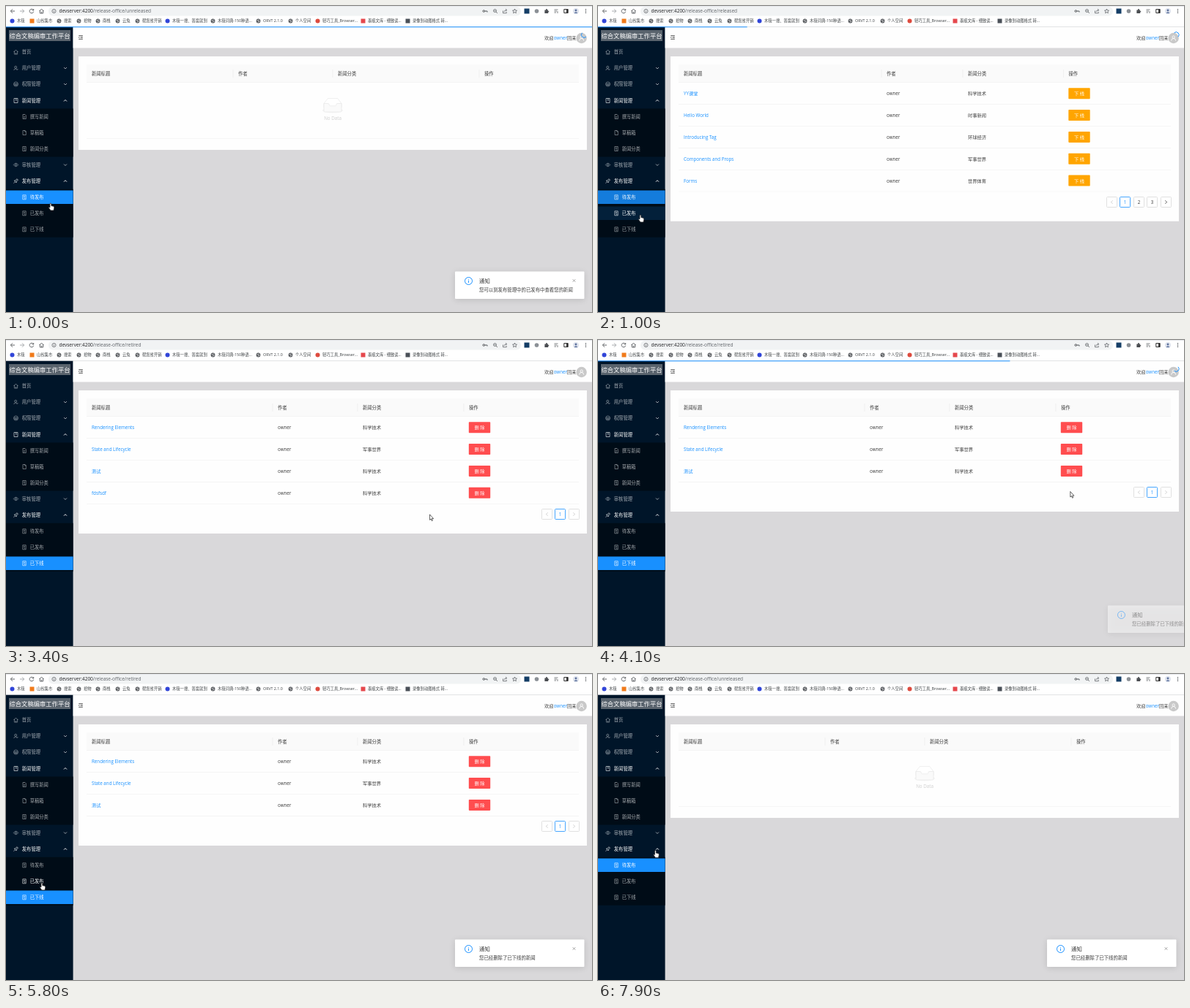
Write an HTML page with a canvas that moves like this. It is 800 px wide and 419 px high and loops after 8 s.

```html
<!DOCTYPE html>
<html lang="zh-CN">
<head>
<meta charset="utf-8">
<title>Publishing console</title>
<style>
html, body { margin: 0; width: 100%; height: 100%; overflow: hidden; background: #d9d8da; }
canvas { display: block; width: 800px; height: 419px; }
</style>
</head>
<body>
<canvas id="stage" width="800" height="419"></canvas>
<script>
const ctx = document.getElementById('stage').getContext('2d');
const LOOP = 8000, BLUE = '#1890ff', INK = '#3a3a3a', EDGE = '#f0f0f0', SIDE = 91.6;
const FONT = '"Open Sans", "Noto Sans CJK SC", "Noto Sans CJK", sans-serif';

// ---------- helpers ----------
const clamp = v => Math.max(0, Math.min(1, v));
const ease = v => (v = clamp(v)) < .5 ? 4 * v ** 3 : 1 - 4 * (1 - v) ** 3;

function track(keys, t) {
  let i = 1;
  while (i < keys.length - 1 && keys[i][0] < t) i++;
  const [a, b] = [keys[i - 1], keys[i]], p = clamp((t - a[0]) / (b[0] - a[0]));
  return a.slice(1).map((v, k) => v + (b[k + 1] - v) * p);
}

function rect(x, y, w, h, fill, stroke, r = 0) {
  ctx.beginPath();
  ctx.roundRect(x, y, w, h, r);
  if (fill) { ctx.fillStyle = fill; ctx.fill(); }
  if (stroke) { ctx.strokeStyle = stroke; ctx.lineWidth = .8; ctx.stroke(); }
}

function dot(x, y, r, fill) {
  ctx.beginPath();
  ctx.arc(x, y, r, 0, 7);
  ctx.fillStyle = fill;
  ctx.fill();
}

function text(str, x, y, size = 6.23, color = INK, weight = 400, align = 'left') {
  ctx.font = `${weight} ${size}px ${FONT}`;
  ctx.textAlign = align;
  ctx.fillStyle = color;
  ctx.fillText(str, x, y + size * .37);
}

function icon(d, x, y, stroke, fill, width = .75) {
  ctx.save();
  ctx.translate(x, y);
  const path = new Path2D(d);
  if (fill) { ctx.fillStyle = fill; ctx.fill(path); }
  if (stroke) { ctx.strokeStyle = stroke; ctx.lineWidth = width; ctx.stroke(path); }
  ctx.restore();
}

const ring = r => `M${-r} 0a${r} ${r} 0 1 0 ${2 * r} 0a${r} ${r} 0 1 0 ${-2 * r} 0`;
const ICONS = {
  home: 'M-3 0L0 -3L3 0M-2.1 -1V3H2.1V-1M0 3V1',
  user: 'M-2.8 3a2.6 2.6 0 0 1 4.6 -1M-1.8 -1.2a1.5 1.5 0 1 0 3 0a1.5 1.5 0 1 0 -3 0M1 3L3 1',
  crown: ring(3) + 'M-1.5 -1L0 0L1.5 -1V1.4H-1.5Z',
  book: 'M-2.5 -3H2.5V3H-2.5ZM.2 -3V0L1 -.6',
  write: 'M-2 -3H1L2.3 -1.7V3H-2ZM-1 .2H1.2M-1 1.6H.6',
  file: 'M-2 -3H1L2.3 -1.7V3H-2ZM.8 -3V-1.5H2.3',
  list: 'M-2.2 -3H2.2V3H-2.2ZM-1.1 -1.3H1.1M-1.1 .3H1.1M0 1.8H1.1',
  eye: 'M-3.2 0Q0 -4.4 3.2 0Q0 4.4 -3.2 0Z' + ring(1),
  pin: 'M-3 3L-.8 .8M-2.3 -.6L0 -1L1.4 -3L3 -1.4L1 0L.6 2.3Z',
  down: 'M-2 -1L0 1L2 -1', up: 'M-2 1L0 -1L2 1',
  left: 'M1.2 -2.2L-1.2 0L1.2 2.2', right: 'M-1.2 -2.2L1.2 0L-1.2 2.2',
  cross: 'M-1.8 -1.8L1.8 1.8M1.8 -1.8L-1.8 1.8',
  hand: 'M-2 -4.3Q-1 -5.6 -.2 -4.3V-1.4L2.8 -.7Q4 -.3 3.8 1.3L3 4.9H-1L-3.7 1.3Q-3.5 0 -2 1Z',
  arrow: 'M-2.2 -4.5V3L-.6 1.6L.6 4.3L1.7 3.8L.6 1.2H2.9Z'
};

// ---------- data ----------
const MENU = [
  ['首页', 63, 'home'], ['用户管理', 85, 'user', 'down'], ['权限管理', 107, 'crown', 'down'],
  ['新闻管理', 129.5, 'book', 'up'], ['撰写新闻', 151.5, 'write'], ['草稿箱', 173.5, 'file'],
  ['新闻分类', 195.5, 'list'], ['审核管理', 217.5, 'eye', 'down'], ['发布管理', 239.7, 'pin', 'up'],
  ['待发布', 261.8, 'list'], ['已发布', 283.8, 'list'], ['已下线', 305.8, 'list']
];
const BOOKMARKS = [
  [8, '木筏', '#3145d8'], [35, '山谷集市', '#f07a1a', 1], [72, '搜索'], [99, '拾物'], [125, '南栈'],
  [152, '云兔'], [179, '帮您省开销'], [220, '木筏一搜、答案就到', '#3145d8'],
  [282, '木筏词典-150种语...'], [344, 'ORVT 2.1.0'], [388, '个人空间'],
  [425, '轻巧工具_Browser...', '#dd4b3e'], [487, '墨痕文库 - 细致读...', '#e5484d', 1],
  [548, '录像到动图格式 转...', '#4a5058', 1]
];
const PAGES = [
  { path: 'unreleased', cols: [117, 317, 453, 653], rows: [] },
  { path: 'released', cols: [117, 394, 505, 642.5], action: '下 线', color: '#ffa500', hover: '#ffb733', pages: 3,
    rows: [['YY课堂', '科学技术'], ['Hello World', '时事新闻'], ['Introducing Tag', '环球经济'],
      ['Components and Props', '军事世界'], ['Forms', '世界体育']] },
  { path: 'retired', cols: [117, 371, 487, 632], action: '删 除', color: '#ff4d4f', hover: '#ff7875', pages: 1,
    rows: [['Rendering Elements', '科学技术'], ['State and Lifecycle', '军事世界'], ['测试', '科学技术'],
      ['fdsfsdf', '科学技术']] }
];
const DELETE_AT = 3900;
const VISITS = [[-400, 0], [900, 1], [2130, 2], [5900, 1], [7300, 0]];
const LOADS = [-300, 900, 2130, DELETE_AT, 5900, 7300];
const BAR = [[0, 0], [70, .11], [100, .25], [200, .7], [300, 1]];
const POINTER = [
  [100, 62, 275], [700, 59, 291], [1050, 59, 291], [1600, 57, 315], [1850, 57, 315], [1900, 56.5, 315],
  [2850, 56.5, 315], [3100, 240, 290], [3400, 580.5, 243.5], [3700, 647, 212], [4300, 647, 212],
  [4900, 389.5, 256.5], [5500, 50, 291], [6450, 50, 291], [7000, 65.5, 269.5], [7400, 65.5, 269.5], [7850, 79.5, 246.5]
];

// ---------- parts ----------
function browser(page) {
  const grey = '#55585c';
  rect(0, 0, 800, 28, '#fff');
  rect(0, 0, 800, .7, '#dee1e6');
  rect(0, 28, 800, .7, '#d8dadd');
  rect(58, 1, 645, 12.5, '#f1f3f4', null, 6.2);
  icon('M3 0H-2.6M0 -2.7L-2.7 0L0 2.7', 9, 7, grey, null, .9);
  icon('M-3 0H2.6M0 -2.7L2.7 0L0 2.7', 22, 7, '#a0a3a6', null, .9);
  icon('M2.2 -1.7a2.8 2.8 0 1 0 .5 2.4M2.7 -3V-1H.7', 35, 7, grey, null, .9);
  icon(ICONS.home, 48.5, 7, grey, null, .9);
  icon(ring(2.6) + 'M0 -.4V1.5M0 -1.5V-1', 65.5, 7, grey);
  const host = 'devserver:4200';
  text(host, 72.5, 7, 6.5, '#202124');
  const hostEnd = 72.5 + ctx.measureText(host).width;
  text('/release-office/' + page.path, hostEnd, 7, 6.5, '#5f6368');

  icon('M-3 0a1.3 1.3 0 1 0 2.6 0a1.3 1.3 0 1 0 -2.6 0M-.4 0H3V1.5', 654, 7, grey, null, 1);
  icon('M-2.5 -.5a2 2 0 1 0 4 0a2 2 0 1 0 -4 0M1 1L3 3M-1.4 -.5H.5', 668, 7, grey);
  icon('M-2.5 -.5V2.7H2.3V1.2M-1 1Q-.6 -1.4 2.5 -1.4M1.2 -3L2.8 -1.4L1.2 .2', 681, 7, grey);
  icon('M0 -3L.9 -1L3 -.8L1.4 .6L1.9 2.7L0 1.6L-1.9 2.7L-1.4 .6L-3 -.8L-.9 -1Z', 694.5, 7, grey);
  rect(707.5, 3.5, 7, 7, '#153e66');
  dot(724.5, 7, 2.8, '#8b9096');
  icon('M-2.6 -1.6H-.8V-3H.8V-1.6H2.2V0H3.2V1.3H2.2V3H-2.6Z', 738, 7, null, '#4a4d51');
  icon('M-2.5 -2H2.5M-2.5 0H1M-2.5 2H0M2 0V3', 751, 7, grey);
  icon('M-2.7 -2.5H2.7V2.5H-2.7Z', 764.5, 7, '#333', null, 1);
  rect(765, 4.5, 2.2, 5, '#333');
  dot(778, 7, 4, '#dfe4ee');
  dot(778, 6, 1.4, '#5b6f9a');
  icon('M-2.5 3Q0 -.6 2.5 3Z', 778, 7, null, '#5b6f9a');
  [-2.2, 0, 2.2].forEach(d => dot(791.5, 7 + d, .75, grey));

  for (const [x, label, color, square] of BOOKMARKS) {
    if (!color) {
      dot(x + .5, 20.5, 2.9, '#55585c');
      icon('M-1.8 -.8H.2L1.2 -2M-.6 2L.4 .6H2', x + .5, 20.5, '#fff');
    } else if (square) rect(x - 2.5, 17.5, 6, 6, color);
    else dot(x + .5, 20.5, 3, color);
    text(label, x + 7, 20.5, 5.3, '#3c4043');
  }
}

function sidebar(t, visit, previous, tip) {
  rect(0, 28.7, SIDE, 391, '#001529');
  rect(0, 140.5, SIDE, 66, '#000c17');
  rect(0, 250.7, SIDE, 66, '#000c17');
  rect(4, 33, 84, 15, '#59636d');
  text('综合文稿编审工作平台', 4.5, 40.5, 8.3, '#fff');

  const shown = ease((t - visit[0]) / 300);
  MENU.forEach(([label, y, glyph, caret], i) => {
    const sub = i > 8 || (i > 3 && i < 7), tab = i - 9;
    const chosen = tab === visit[1] ? shown : previous && tab === previous[1] ? 1 - shown : 0;
    if (chosen) {
      ctx.globalAlpha = chosen;
      rect(0, y - 9.3, SIDE, 18.4, BLUE);
      ctx.globalAlpha = 1;
    }
    const hovered = tip.x < SIDE && Math.abs(tip.y - y) < 11;
    const lit = hovered || caret === 'up' ? 1 : chosen;
    const color = `rgba(255,255,255,${.65 + .35 * lit})`;
    icon(ICONS[glyph], sub ? 25 : 13.5, y, color, null, .6);
    text(label, sub ? 32.7 : 21.8, y, 6.3, color, lit > .5 ? 500 : 400);
    if (caret) icon(ICONS[caret], 81, y, color, null, .9);
  });
}

function header() {
  rect(SIDE, 28.7, 800 - SIDE, 28.8, '#fefefe');
  icon('M-2.8 -2.5H2.8M-.4 -.8H2.8M-.4 .8H2.8M-2.8 2.5H2.8M-1.4 -1.2L-2.8 0L-1.4 1.2', 102, 43, '#444');
  text('欢迎', 735, 43.5);
  text('owner', 747.7, 43.5, 6.23, BLUE);
  text('回来', 766, 43.5);
  dot(785.7, 44, 7.2, '#c9c9c9');
  icon('M-1.7 -1.4a1.7 1.7 0 1 0 3.4 0a1.7 1.7 0 1 0 -3.4 0M-3 3.6a3 3.2 0 0 1 6 0', 785.7, 44, '#fff', null, .9);
}

function pager(y, count) {
  const first = 775 - 18.4 * (count + 1);
  for (let i = 0; i <= count + 1; i++) {
    const x = Math.floor(first + 18.4 * i) + .5, active = i === 1, arrow = i === 0 || i > count;
    const off = i === 0 || (i > count && count === 1);
    rect(x - 7, y - 7, 14, 14, '#fff', active ? BLUE : '#d9d9d9', 1);
    if (arrow) icon(ICONS[i ? 'right' : 'left'], x, y, off ? '#c4c4c4' : '#333');
    else text(i, x, y, 6.23, active ? BLUE : INK, 400, 'center');
  }
}

function emptyTable() {
  ctx.beginPath();
  ctx.ellipse(446, 143, 14, 3.4, 0, 0, 7);
  ctx.fillStyle = '#f5f5f5';
  ctx.fill();
  icon('M-12 -2.5L-6.6 -9.5H6.6L12 -2.5V3H-12Z', 446, 136, '#e4e4e4', '#fff', .6);
  icon('M-12 -2.5H-6Q-4.8 -2.4 -4.8 -.8Q-4.6 .8 -3.4 .8H3.4Q4.6 .8 4.8 -.8Q4.8 -2.4 6 -2.5H12V7.5Q12 9 10.5 9H-10.5Q-12 9 -12 7.5Z',
    446, 136, '#e4e4e4', '#fafafa', .6);
  text('No Data', 446, 154, 6.23, '#cfcfcf', 400, 'center');
  rect(110, 181, 672, .6, EDGE);
}

function table(page, rows, pointer) {
  const { cols } = page, step = 29.85, last = 105 + step * rows.length;
  rect(99, 69, 694, rows.length ? last - 28.5 : 128, '#fefefe');
  rect(110, 80, 672, 25, '#fafafa');
  rect(110, 104.5, 672, .6, EDGE);
  ['新闻标题', '作者', '新闻分类', '操作'].forEach((label, i) => {
    text(label, cols[i], 92.5, 6.3, INK, 500);
    if (i) rect(cols[i] - 7.3, 87, .6, 11, '#e9e9e9');
  });
  if (!rows.length) return emptyTable();

  let overButton = false;
  rows.forEach(([title, category], i) => {
    const y = 120 + step * i, x = cols[3];
    const hot = Math.abs(pointer.x - x - 14.5) < 14.5 && Math.abs(pointer.y - 5 - y) < 7.5;
    overButton ||= hot;
    text(title, cols[0], y, 6.23, BLUE);
    text('owner', cols[1], y);
    text(category, cols[2], y);
    rect(x - .2, y - 7.8, 29.4, 15, hot ? page.hover : page.color, null, .8);
    text(page.action, x + 14.5, y, 6.23, '#fff', 400, 'center');
    rect(110, 104.5 + step * (i + 1), 672, .6, EDGE);
  });
  pager(Math.round(last + 14.7) - .5, page.pages);
  return overButton;
}

function notice(message, shift, alpha) {
  if (alpha <= 0) return;
  ctx.save();
  ctx.globalAlpha = alpha;
  ctx.translate(shift, 0);
  ctx.shadowColor = 'rgba(0,0,0,.13)';
  ctx.shadowBlur = 9;
  ctx.shadowOffsetY = 1.5;
  rect(613, 363.5, 176.5, 37.5, '#fff', null, 1);
  ctx.shadowColor = 'transparent';
  icon(ring(5), 631.5, 376.5, BLUE, null, 1);
  icon('M0 -.8V2.6M0 -2.6V-1.8', 631.5, 376.5, BLUE, null, .9);
  text('通知', 646, 376.5, 7.4);
  text(message, 646, 389, 6.4);
  icon(ICONS.cross, 775.5, 376, '#888');
  ctx.restore();
}

function progress(t) {
  const dt = t - LOADS.findLast(start => start <= t);
  const alpha = 1 - clamp((dt - 310) / 160);
  if (!alpha) return;
  ctx.globalAlpha = alpha;
  rect(0, 28.2, 800 * track(BAR, dt)[0], 1.1, BLUE);
  const turn = dt / 400 * 2 * Math.PI;
  ctx.beginPath();
  ctx.arc(789.3, 39.5, 3.8, turn - Math.PI * 1.25, turn - Math.PI / 4);
  ctx.strokeStyle = BLUE;
  ctx.lineWidth = 1;
  ctx.stroke();
  ctx.globalAlpha = 1;
}

function draw(t) {
  const [x, y] = track(POINTER, t), tip = { x: x - 1, y: y - 5 };
  const at = VISITS.findLastIndex(v => v[0] <= t), visit = VISITS[at];
  const page = PAGES[visit[1]];
  const rows = visit[1] === 2 && t >= DELETE_AT ? page.rows.slice(0, 3) : page.rows;

  rect(0, 0, 800, 419, '#d9d8da');
  browser(page);
  sidebar(t, visit, VISITS[at - 1], tip);
  header();
  const overButton = table(page, rows, { x, y });

  notice('您可以到发布管理中的已发布中查看您的新闻', 0, 1 - ease((t - 300) / 250));
  const enter = ease((t - DELETE_AT - 100) / 200);
  notice('您已经删除了已下线的新闻', 171 * (1 - enter), enter);
  progress(t);

  const hand = tip.x < SIDE || overButton;
  icon(ICONS[hand ? 'hand' : 'arrow'], x, y, '#222', '#fff', .7);
}

function frame() {
  draw(performance.now() % LOOP);
  requestAnimationFrame(frame);
}
frame();
</script>
</body>
</html>
```
